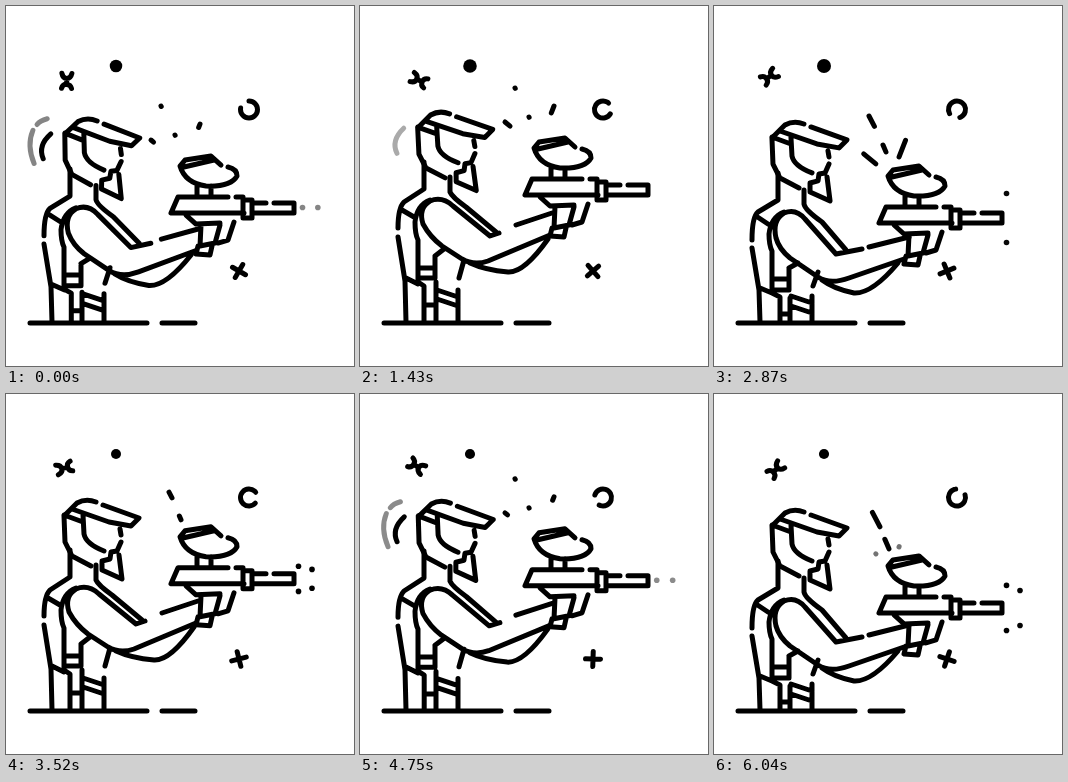
Animation, 348 px wide and 360 px high, one loop 6.06 s. Source, as an HTML page with a canvas:

```html
<!DOCTYPE html>
<html>
<head>
<meta charset="utf-8">
<style>
html, body { margin: 0; width: 100%; height: 100%; overflow: hidden; background: #fff; }
canvas { display: block; }
</style>
</head>
<body>
<canvas width="348" height="360"></canvas>
<script>
const ctx = document.querySelector('canvas').getContext('2d');
const LOOP = 6060, CYCLE = 3268, SHOT = 240;
const HIGH_START = 5, LOW_START = 1552;

// Body outline with the gun lowered and raised; same commands in both.
const BODY_LOW = `M64 167L64 194L44 206Q38 211 38 234M38 242L45 284L46 316M42 210L54 218
M90 184L90 198Q91 204 108 216L132 244
M148 243L122 248L91 213Q82 202 70 207Q58 214 62 232Q65 243 76 252L104 271Q116 279 135 272L190 253
M155 241L195 231M108 274Q120 283 140 287Q158 288 184 257
M70 206Q57 211 55 228Q55 239 58 245L58 287L66 291L66 316M75 262L75 284M75 262L84 257
M58 273L75 273M58 284L75 284M46 282L58 287M66 308L76 308M76 292L76 316
M77 290L98 297M77 300L98 307M104 266L99 280M98 290L98 315`;
const BODY_HIGH = `M64 156L64 183L44 196Q38 202 38 222M38 231L45 275L46 316M42 204L54 211
M90 171L90 186Q92 191 106 201L136 226
M139 227L130 230L93 200Q82 190 70 195Q58 202 63 218Q70 231 82 240L102 253Q114 260 128 255L190 229
M156 219L192 207M110 257Q125 264 148 266Q164 267 188 233
M70 194Q57 199 55 216Q55 228 58 234L58 276L64 280L64 316M75 250L75 272M75 250L84 243
M58 262L75 262M58 272L75 272M46 272L58 278M64 299L76 299M76 276L76 316
M77 284L98 291M77 293L98 300M104 254L99 272M98 284L98 315`;

const HEAD = `M90 118Q80 114 71 119L58 132L59 158L66 172L85 182
M97 121L133 134L125 142L103 138L66 125M58 131L77 138M77 131L78 150Q80 160 98 167
M114 145L115 151M115 158L111 167L105 168L104 175L96 177L96 186L116 195L113 171`;
const ARC_IN = 'M44 132Q31 144 37 157';
const ARC_OUT = 'M40 117Q33 119 30 123M26 129Q20 144 28 162';

const GUN = `M215 169L205 160L179 164L174 170Q179 187 200 190Q225 191 231 180Q231 173 222 171
M178 171L208 164M191 190L191 200M205 190L205 200
M222 201L172 201L165 217L238 217M230 201L237 201
M237 204L246 204L246 222L237 222Z
M248 207L260 207M268 207L288 207L288 217L248 217
M180 219L190 228L214 227M192 250L190 258L204 259L206 250
M195 229L194 250L209 247L214 229M228 226L222 244L212 247`;
const GROUND = 'M24 317H141M156 317H189';
const SPLAT = 'M-5 -8Q-4 -3 0 -3Q4 -3 5 -8M-5 7Q-4 3 0 3Q4 3 5 7M0 -3V3';

// Piecewise linear value through t, v pairs.
function key(t, ...k) {
  if (t <= k[0]) return k[1];
  for (let i = 2; i < k.length; i += 2)
    if (t < k[i]) return k[i - 1] + (k[i + 1] - k[i - 1]) * (t - k[i - 2]) / (k[i] - k[i - 2]);
  return k[k.length - 1];
}

function blend(a, b, f) {
  const to = b.match(/\d+/g);
  let i = 0;
  return a.replace(/\d+/g, n => +n + (to[i++] - n) * f);
}

function stroke(d, width = 5, alpha = 1) {
  ctx.globalAlpha = alpha;
  ctx.lineWidth = width;
  ctx.stroke(new Path2D(d));
}

function dot(x, y, r, alpha = 1) {
  ctx.globalAlpha = alpha;
  ctx.beginPath();
  ctx.arc(x, y, r, 0, 7);
  ctx.fill();
}

function at(x, y, deg, draw) {
  ctx.save();
  ctx.translate(x, y);
  ctx.rotate(deg * Math.PI / 180);
  draw();
  ctx.restore();
}

function shotAge(c) {
  if (c < HIGH_START) return c + CYCLE - LOW_START - 6 * SHOT;
  const [start, last] = c < LOW_START ? [HIGH_START, 5] : [LOW_START, 6];
  return c - start - SHOT * Math.min(last, Math.floor((c - start) / SHOT));
}

function ray(x1, y1, x2, y2, from, to, alpha = 1) {
  const x = f => x1 + (x2 - x1) * f, y = f => y1 + (y2 - y1) * f;
  stroke(`M${x(from)} ${y(from)}L${x(to)} ${y(to) + .01}`, 5, alpha);
}

function spray(a) {
  const tail = key(a, 20, 0, 65, .36, 118, .5, 175, .98);
  const head = key(a, 0, 0, 20, .68, 50, 1);
  ray(166, 131, 155, 110, tail, head);
  ray(175, 153, 169, 139, tail, head);
  const tail2 = key(a, 118, 0, 177, .5, 190, .52, 218, .68, 276, .85);
  const head2 = key(a, 20, 0, 65, .58, 118, .72, 190, .97, 218, 1);
  const alpha = key(a, 10, 0, 30, 1);
  ray(162, 158, 145, 144, tail2, head2, alpha);
  ray(185, 151, 194, 128, tail2, head2, alpha);
}

function muzzle(a, k) {
  const back = key(a, 0, 6, 20, 22.5, 65, 25.5, 118, 24.5);
  const front = key(a, 0, 4, 20, 17.5, 65, 18.5);
  for (const s of [-1, 1]) {
    dot(292.5, 212 + s * back, 2.8, key(a, 118, 1, 145, 0));
    dot(306, 212 + s * front, 2.8, key(a, 20, 1, 65, .5, 90, 0));
  }
  const alpha = key(k, 120, 0, 128, 1, 150, .5, 172, 0);
  dot(290 + (k - 125) * .25, 211.5, 2.8, alpha);
  dot(290 + (k - 125) * .84, 211.5, 2.8, alpha);
}

function ornaments(t) {
  dot(110, 60, 6 + Math.cos((t - 2870) / 1300 * 2 * Math.PI));
  const swing = .5 + .586 * Math.cos((t - 780) / 2160 * 2 * Math.PI);
  const s = Math.max(0, Math.min(1, swing));
  at(61.5 - 6.5 * s, 76 - 5 * s, 45 - 350 * s, () => stroke(SPLAT));
  at(243, 103.5, 230 - .167 * t, () => {
    ctx.globalAlpha = 1;
    ctx.lineWidth = 5;
    ctx.beginPath();
    ctx.arc(0, 0, 8.5, .7, 2 * Math.PI - .7);
    ctx.stroke();
  });
  at(233, 265, 30 + .013 * t, () => stroke('M-7.5 0H7.5M0 -7.5V7.5'));
}

function frame(now) {
  const t = now % LOOP, c = t % CYCLE;
  const lift = key(c, 0, .35, 120, 1, 1470, 1, 1600, 0, 3210, 0, CYCLE, .35);
  const a = shotAge(c);
  const k = a > SHOT ? a - 126 : a; // the change of aim jolts once more

  ctx.globalAlpha = 1;
  ctx.fillStyle = '#fff';
  ctx.fillRect(0, 0, 348, 360);
  ctx.fillStyle = ctx.strokeStyle = '#000';
  ctx.lineCap = ctx.lineJoin = 'round';

  stroke(GROUND);
  ornaments(t);
  stroke(blend(BODY_LOW, BODY_HIGH, lift));

  const nod = key(a, 118, 0, 170, -5, 220, -5, 240, 0, 276, 2) * (1 - .85 * lift);
  at(70, 165 - 10 * lift, nod, () => {
    ctx.translate(-70, -165);
    stroke(HEAD);
    stroke(ARC_IN, 5, key(k, 122, 0, 132, 1, 160, 1, 190, .8, 218, .6, 236, 0));
    stroke(ARC_OUT, 5, key(k, 122, 0, 132, 1, 150, .5, 172, 0));
  });

  const kick = key(a, 0, 0, 20, 2, 60, 0);
  at(0, kick - 28 * lift, 0, () => {
    stroke(GUN);
    spray(a);
    muzzle(a, k);
  });
}

const begin = performance.now();
function tick() {
  frame(performance.now() - begin);
  requestAnimationFrame(tick);
}
tick();
</script>
</body>
</html>
```
